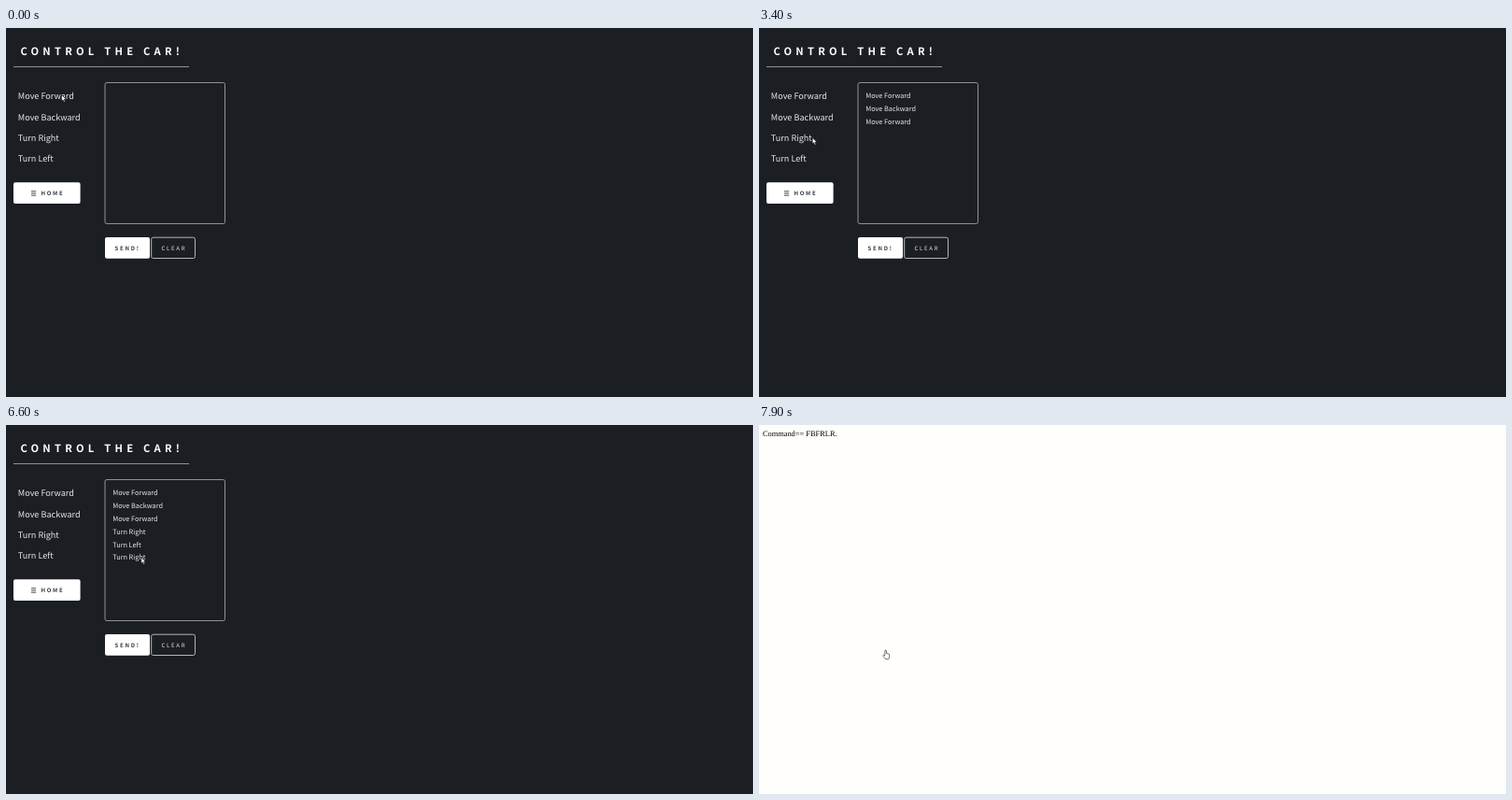
Animation, 800 px wide and 395 px high, one loop 8000 ms. Source, as an HTML page:

```html
<!DOCTYPE html>
<html lang="en">
<head>
<meta charset="utf-8">
<title>Control the car</title>
<style>
  html, body { margin: 0; width: 100%; height: 100%; overflow: hidden; background: #1b1e23; }
  svg { display: block; width: 800px; height: 395px; }
  text {
    font-family: "Noto Sans CJK JP", "Noto Sans CJK SC", "Noto Sans CJK", "Noto Sans", sans-serif;
    font-weight: 300;
    fill: #e6e7e8;
    text-rendering: geometricPrecision;
    white-space: pre;
  }
  .title { font-size: 11.2px; font-weight: 600; letter-spacing: 4.22px; fill: #fff; }
  .menu { font-size: 9.1px; }
  .item { font-size: 7.33px; }
  .label { font-size: 6px; letter-spacing: 1.75px; }
  .dark { font-weight: 600; fill: #36393d; }
  .reply { font: 8.38px "Liberation Serif", serif; fill: #000; }
  .edge { fill: none; stroke: #909396; }
  .bright { stroke: #b4b6b8; }
  .fill { fill: #fff; }
</style>
</head>
<body>
<svg viewBox="0 0 800 395">
  <g id="panel">
    <rect width="800" height="395" fill="#1b1e23"/>
    <text class="title" x="15.4" y="29.4">CONTROL THE CAR!</text>
    <path class="edge" d="M8 41.5H196"/>
    <g id="menu"></g>
    <rect class="fill" x="8" y="165.3" width="71.6" height="22.7" rx="2"/>
    <path d="M27 174.8h5.2m-5.2 2.2h5.2m-5.2 2.2h5.2" stroke="#36393d" stroke-width=".9"/>
    <text class="label dark" x="37.4" y="179.2">HOME</text>
    <rect class="edge" x="106" y="58.5" width="128.5" height="151" rx="2"/>
    <g id="list"></g>
    <rect class="fill" x="106" y="224" width="48" height="22.8" rx="2"/>
    <text class="label dark" x="116.6" y="238">SEND!</text>
    <rect class="edge bright" x="155.7" y="224.2" width="46.8" height="22.3" rx="2"/>
    <text class="label" x="166.4" y="238">CLEAR</text>
  </g>
  <g id="page">
    <rect width="800" height="395" fill="#fffefd"/>
    <text class="reply" x="3.9" y="11.8">Command== FBFRLR.</text>
  </g>
  <g id="cursor" fill="#fff" stroke="#111" stroke-width=".6" stroke-linejoin="round">
    <path id="arrow" d="M0 0V6.7L1.5 5.3 2.6 7.8 3.8 7.3 2.7 4.9H4.8Z"/>
    <path id="hand" d="M2.2 5.8V1Q2.2 0 3 0T3.8 1V3.4Q4.9 2.9 5 3.8 6 3.4 6.1 4.3 7 4 7 5V7.2Q7 8.4 6.2 9.6H2.9Q2.4 8.5 .4 6.4 0 5.7.7 5.3 1.2 5 2.2 5.8Z"/>
  </g>
</svg>
<script>
const LOOP = 8000, STEP = 100, SENT = 7800, DRAG = 400, BACK = 500;
const $ = id => document.getElementById(id);
const commands = ["Move Forward", "Move Backward", "Turn Right", "Turn Left"];

// Each trip drags one command into the box, then heads for the next grab point.
const trips = [
  { start: 0, command: 0, grab: [59.5, 71.5], drop: [170, 86] },
  { start: 1100, command: 1, grab: [50.5, 98], drop: [165, 108], back: 800 },
  { start: 2400, command: 0, grab: [57, 75.5], drop: [155, 118] },
  { start: 3300, command: 2, grab: [40, 121.5], drop: [150, 95] },
  { start: 4200, command: 3, grab: [43.8, 143], drop: [163, 110], back: 1100 },
  { start: 6000, command: 2, grab: [34.5, 119.5], drop: [148, 156] }
];
const rest = { start: 6900, time: 700, grab: [139, 115], button: [132.6, 241] };

function addText(parent, cls, x, y, str) {
  const el = document.createElementNS("http://www.w3.org/2000/svg", "text");
  el.setAttribute("class", cls);
  el.setAttribute("x", x);
  el.setAttribute("y", y);
  el.textContent = str;
  return parent.appendChild(el);
}

commands.forEach((name, i) => addText($("menu"), "menu", 12.8, 76.2 + i * 22.4, name));
const items = trips.map(({ command }, i) =>
  addText($("list"), "item", 114.2, 75.2 + i * 13.85, commands[command]));

function glide(a, b, u) {
  u = Math.min(Math.max(u, 0), 1);
  const e = u * u * (3 - 2 * u);
  return a.map((v, i) => v + (b[i] - v) * e);
}

function pointer(t) {
  if (t >= rest.start) return glide(rest.grab, rest.button, (t - rest.start) / rest.time);
  const i = trips.findLastIndex(trip => t >= trip.start);
  const { start, grab, drop, back = BACK } = trips[i];
  const age = t - start;
  if (age < DRAG) return glide(grab, drop, age / DRAG);
  return glide(drop, (trips[i + 1] || rest).grab, (age - DRAG) / back);
}

const show = (el, on) => { el.style.display = on ? "" : "none"; };

function draw(now) {
  const t = Math.floor(now % LOOP / STEP) * STEP;
  const [x, y] = pointer(t);
  const overButton = y >= 224;
  $("cursor").setAttribute("transform", `translate(${x} ${y})`);
  show($("arrow"), !overButton);
  show($("hand"), overButton);
  items.forEach((el, i) => show(el, t >= trips[i].start + DRAG));
  show($("panel"), t < SENT);
  show($("page"), t >= SENT);
}

const start = performance.now();
function tick() {
  draw(performance.now() - start);
  requestAnimationFrame(tick);
}
tick();
</script>
</body>
</html>
```
